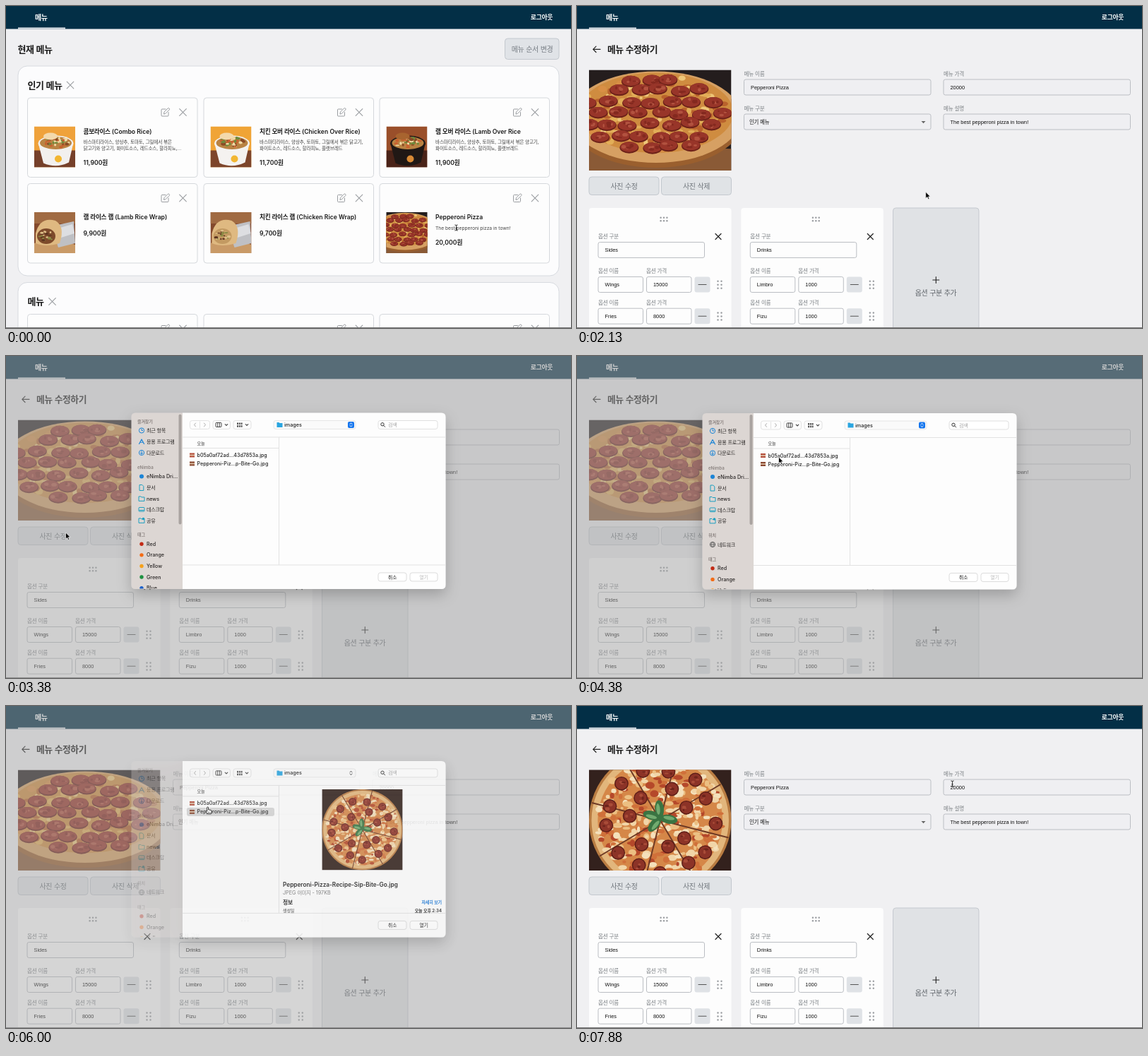
An HTML page that plays this animation: 800x456 px, repeating every 8000 ms.

```html
<!DOCTYPE html>
<html lang="ko">
<head>
<meta charset="utf-8">
<style>
html, body { margin: 0; width: 100%; height: 100%; overflow: hidden; background: #f0f0f2; }
svg { display: block; }
text { font-family: Inter, "Noto Sans CJK KR", sans-serif; white-space: pre; }
.form { font-family: "Liberation Sans", "Noto Sans CJK KR", sans-serif; }
.ko { letter-spacing: -.035em; }
</style>
</head>
<body>
<svg id="stage" width="800" height="456" viewBox="0 0 800 456"></svg>
<script>
// ---------- drawing helpers ----------
const rect = (x, y, w, h, fill, stroke = 'none', r = 0, more = '') =>
  `<rect x="${x}" y="${y}" width="${w}" height="${h}" rx="${r}" fill="${fill}" stroke="${stroke}" ${more}/>`;
const oval = (x, y, rx, ry, fill, more = '') =>
  `<ellipse cx="${x}" cy="${y}" rx="${rx}" ry="${ry}" fill="${fill}" ${more}/>`;
const dot = (x, y, r, fill) => oval(x, y, r, r, fill);
const line = (d, color, w = 1, fill = 'none') =>
  `<path d="${d}" fill="${fill}" stroke="${color}" stroke-width="${w}" stroke-linecap="round" stroke-linejoin="round"/>`;
const shape = (d, fill) => `<path d="${d}" fill="${fill}"/>`;
const group = (id, body, more = '') => `<g id="${id}" ${more}>${body}</g>`;

// y is the optical middle of the line
const text = (x, y, s, size, color = '#222', weight = 400, more = '') =>
  `<text x="${x}" y="${y + size * .36}" font-size="${size}" font-weight="${weight}" fill="${color}" ${more}>` +
  s.replace(/[가-힣]+/g, '<tspan class="ko">$&</tspan>') + '</text>';
const MID = 'text-anchor="middle"', END = 'text-anchor="end"';

const cross = (x, y, r, color, w = 1) =>
  line(`M${x - r} ${y - r}l${2 * r} ${2 * r}m0 ${-2 * r}l${-2 * r} ${2 * r}`, color, w);
const dots = (x, y, cols, rows, gap, color) => {
  let s = '';
  for (let i = 0; i < cols * rows; i++)
    s += dot(x + (i % cols - (cols - 1) / 2) * gap, y + (Math.floor(i / cols) - (rows - 1) / 2) * gap, 1.2, color);
  return s;
};

let seed = 7;
const rnd = (a = 0, b = 1) => {
  seed = (seed * 16807) % 2147483647;
  return a + (b - a) * seed / 2147483647;
};
// count small random ovals spread over an ellipse
const speckle = (count, x, y, rx, ry, size, colors) => {
  let s = '';
  for (let i = 0; i < count; i++) {
    const a = rnd(0, 6.28), q = Math.sqrt(rnd());
    s += oval(x + rx * q * Math.cos(a), y + ry * q * Math.sin(a), rnd(.3, 1) * size, rnd(.25, .7) * size, colors[i % colors.length]);
  }
  return s;
};

// ---------- pictures ----------
const photo = (name, x, y, w, h) => {
  const [body, vw, vh] = photos[name];
  return `<svg x="${x}" y="${y}" width="${w}" height="${h}" viewBox="0 0 ${vw} ${vh}" preserveAspectRatio="xMidYMid slice">${body}</svg>`;
};

const bowl = (wall, table, cup, badge, bread) =>
  rect(0, 0, 58, 58, wall) + rect(0, 34, 58, 24, table) +
  shape('M6 25L13 52Q31 60 49 51L55 25Z', cup) + oval(30.5, 24, 25, 11, cup) + oval(30.5, 23.5, 22.5, 9, '#b98343') +
  speckle(40, 30.5, 23, 19, 7, 3.5, ['#f0d9a4', '#8a4a25', '#6f8a3c', '#c9602f']) +
  oval(23, 14, 10, 5, bread) + dot(34, 46, 5, badge);

const wrap = filling =>
  rect(0, 0, 58, 58, '#84492c') + rect(0, 0, 58, 16, '#a06a42') +
  shape('M0 44L26 36L58 46V58H0Z', '#c99a67') +
  shape('M24 20L56 13L58 44L34 50Z', '#bfc0c4') + shape('M30 24L54 17L57 30L38 36Z', '#dddee1') +
  shape('M2 30Q8 6 30 12Q44 20 36 44Q16 50 2 44Z', '#dfb981') + oval(17, 34, 13, 11, filling) +
  speckle(20, 17, 34, 10, 8, 3, ['#e0c08a', '#5e3420', '#8b8a44']);

function panPizza() {
  let s = rect(0, 0, 202, 143, '#241d1d') + shape('M0 104L202 112V143H0Z', '#8a5a36') +
    oval(95, 73, 122, 66, '#9a5f2e') + oval(95, 67, 121, 65, '#d6a063') + oval(95, 61, 110, 57, '#cf8c40') +
    speckle(160, 95, 61, 105, 53, 7, ['#eec678', '#b9622c', '#e2ae58', '#d98f45']);
  for (let row = 0; row < 7; row++)
    for (let col = 0; col < 8; col++) {
      const x = col * 29 + (row % 2) * 14 + rnd(-4, 4), y = 13 + row * 16 + rnd(-3, 3);
      if (((x - 95) / 110) ** 2 + ((y - 61) / 57) ** 2 > .88) continue;
      s += oval(x, y + 1, 13.5, 8.2, '#6c2119') + oval(x, y, 12.5, 7.2, '#983529') + speckle(4, x, y, 8, 4, 4, ['#b2523f', '#84291f']);
    }
  return s;
}

function basilPizza() {
  let s = rect(0, 0, 114, 114, '#33211d') + dot(57, 57, 57, '#b97c42') + dot(57, 57, 55, '#e2b67c') + dot(57, 57, 50, '#d58748') +
    speckle(380, 57, 57, 50, 50, 4, ['#f4e0bb', '#b5482a', '#ecbf82', '#f1d5a8', '#d0703a']);
  for (let i = 0; i < 4; i++) {
    const a = i * Math.PI / 4 + .25, x = 56 * Math.cos(a), y = 56 * Math.sin(a);
    s += line(`M${57 - x} ${57 - y}L${57 + x} ${57 + y}`, '#6e3a25', 1.1);
  }
  for (let i = 0; i < 20; i++) {
    const outer = i < 13, a = outer ? i * .483 + .1 : i * .898 + .5, q = outer ? 42 : 24;
    const x = 57 + q * Math.cos(a) + rnd(-3, 3), y = 57 + q * Math.sin(a) + rnd(-3, 3);
    s += dot(x, y, 5.6, '#5c1d17') + dot(x, y, 4.8, '#8c3327') + speckle(3, x, y, 3, 3, 2, ['#a94c38', '#6d241b']);
  }
  for (const turn of [10, 130, 195, 265])
    s += `<g transform="translate(57 55) rotate(${turn})">${oval(7, 0, 7, 3.6, '#3a7442')}${oval(7, -1, 4.5, 1.5, '#72ab70')}</g>`;
  return s;
}

const photos = {
  combo: [bowl('#efa23b', '#76402a', '#f2f0ee', '#f2b632', '#f3d9ac'), 58, 58],
  chicken: [bowl('#f0a436', '#7d452b', '#f4f2f0', '#f2b632', '#f3d9ac'), 58, 58],
  lamb: [bowl('#9a4f2a', '#4a2318', '#201815', '#d98a35', '#a8642f'), 58, 58],
  lambWrap: [wrap('#7d4a2b'), 58, 58],
  chickenWrap: [wrap('#c39a62'), 58, 58],
  pan: [panPizza(), 202, 143],
  basil: [basilPizza(), 114, 114],
};

// ---------- pages ----------
const GRAY = '#9a9da1';
const nav = rect(0, 0, 800, 32.5, '#032f46') + rect(17, 30.5, 67, 2, '#e6eaee') +
  text(41, 16, '메뉴', 10, '#fff', 600) + text(774, 16, '로그아웃', 8.8, '#fff', 600, END);

const editIcon = (x, y) =>
  line(`M${x + .5} ${y - 4.5}H${x - 4.5}Q${x - 5.5} ${y - 4.5} ${x - 5.5} ${y - 3.5}V${y + 4.5}Q${x - 5.5} ${y + 5.5} ${x - 4.5} ${y + 5.5}H${x + 3.5}Q${x + 4.5} ${y + 5.5} ${x + 4.5} ${y + 4.5}V${y}`, GRAY) +
  line(`M${x - 2} ${y + 2.2}l.5 -2.7 5.2 -5.2q1.1 -.6 1.9 .2t.2 1.9l-5.2 5.2z`, GRAY);

const panel = (y, title, w) => rect(17, y, 766, 297, '#fcfcfd', '#d7dadf', 13) +
  text(30.5, y + 27, title, 13, '#1b1b1b', 700) + cross(w, y + 27, 4.8, GRAY, 1.1);

function card(i, row, picture, title, price, lines = []) {
  const x = [30.5, 280, 529][i], y = [130, 251.5, 436.5][row];
  let s = rect(x, y, 240.5, 112.5, '#fdfdfd', '#d5d8dc', 4) + editIcon(x + 195, y + 20.5) + cross(x + 220, y + 20.5, 4.8, GRAY, 1.1);
  if (!picture) return s;
  s += photo(picture, x + 9.5, y + 40.5, 58, 58) + text(x + 79, y + 47.5, title, 8.65, '#1b1b1b', 600);
  lines.forEach((l, n) => s += text(x + 79, y + 62.7 + n * 9, l, 6.67, '#444'));
  return s + text(x + 79, y + [70, 83.5, 92][lines.length], price, 8.65, '#1b1b1b', 600);
}

const base = '바스마티라이스, 양상추, 토마토, 그릴에서 볶은';
const sauces = '화이트소스, 레드소스, 할라피뇨, 플랫브레드';
const listPage = text(16.5, 61, '현재 메뉴', 13, '#1b1b1b', 700) +
  rect(706.5, 46, 76.5, 29.5, '#e0e3e7', '#c3c8ce', 4) + text(745, 61, '메뉴 순서 변경', 10, '#757b82', 400, MID) +
  panel(85, '인기 메뉴', 91) + panel(391.5, '메뉴', 65.5) +
  card(0, 0, 'combo', '콤보라이스 (Combo Rice)', '11,900원', [base, '닭고기와 양고기, 화이트소스, 레드소스, 할라피뇨,…']) +
  card(1, 0, 'chicken', '치킨 오버 라이스 (Chicken Over Rice)', '11,700원', [base + ' 닭고기,', sauces]) +
  card(2, 0, 'lamb', '램 오버 라이스 (Lamb Over Rice', '11,900원', [base + ' 양고기,', sauces]) +
  card(0, 1, 'lambWrap', '램 라이스 랩 (Lamb Rice Wrap)', '9,900원') +
  card(1, 1, 'chickenWrap', '치킨 라이스 랩 (Chicken Rice Wrap)', '9,700원') +
  card(2, 1, 'pan', 'Pepperoni Pizza', '20,000원', ['The best pepperoni pizza in town!']) +
  card(0, 2) + card(1, 2) + card(2, 2);

const label = (x, y, s) => text(x, y, s, 7.6, '#7c8085');
const input = (x, y, w, s, pad = 9.5, fill = '#fdfdfd') =>
  rect(x, y, w, 22, fill, '#bbbec3', 2.5) + text(x + pad, y + 11, s, 7.41, '#111', 400, 'class="form"');
const field = (x, y, name, value, pad) => label(x, y, name) + input(x, y + 8, 264.5, value, pad, '#efeff2');
const button = (x, s) => rect(x, 242, 99, 25.5, '#e0e3e6', '#c3c8ce', 4) + text(x + 49.5, 255, s, 10, '#6f757b', 400, MID);

function options(x, title, items) {
  let s = rect(x, 286, 201.5, 190, '#fdfdfd', 'none', 4) + dots(x + 106, 302, 3, 2, 4.4, GRAY) +
    label(x + 13, 326.5, '옵션 구분') + cross(x + 183, 326.5, 4, '#222', 1.2) + input(x + 13, 334.5, 150.5, title);
  items.forEach(([name, price], n) => {
    const y = 375.5 + n * 44.7;
    s += label(x + 13, y, '옵션 이름') + label(x + 81, y, '옵션 가격') +
      input(x + 13, y + 8, 63.5, name) + input(x + 81.5, y + 8, 63.5, price) +
      rect(x + 149.5, y + 8, 22, 22, '#dfe2e6', 'none', 3) + line(`M${x + 155} ${y + 19}h11`, '#555', 1.1) +
      dots(x + 185, y + 19.3, 2, 3, 5, GRAY);
  });
  return s;
}

const editPage = line('M33 61.3H22.8m4.2 -4.2l-4.2 4.2 4.2 4.2', '#222', 1.2) +
  text(43, 61, '메뉴 수정하기', 12.8, '#1b1b1b', 700) +
  group('oldPhoto', photo('pan', 17, 90.5, 201.5, 142.5)) + group('newPhoto', photo('basil', 17, 90.5, 201.5, 142.5)) +
  button(17, '사진 수정') + button(119.5, '사진 삭제') +
  field(236.5, 96, '메뉴 이름', 'Pepperoni Pizza') + field(519, 96, '메뉴 가격', '20000') +
  field(236.5, 145, '메뉴 구분', '인기 메뉴', 7.5) + field(519, 145, '메뉴 설명', 'The best pepperoni pizza in town!') +
  shape('M487.5 163h6l-3 3.2z', '#666') +
  options(17, 'Sides', [['Wings', '15000'], ['Fries', '8000']]) +
  options(232.3, 'Drinks', [['Limbro', '1000'], ['Fizu', '1000']]) +
  rect(447.5, 286, 121.5, 190, '#e0e2e5', '#c5c9cf', 4) + line('M503.8 388h9m-4.5 -4.5v9', '#222', 1.1) +
  text(508, 406, '옵션 구분 추가', 10, '#5f646a', 400, MID);

// ---------- file dialog ----------
const BLUE = '#1a84d6', TEAL = '#1b9fc0';
const head = (y, s) => text(186, y, s, 6.1, '#8b8380', 600);
const item = (y, s, icon) => `<g transform="translate(192 ${y})">${icon}</g>` + text(199, y, s, 7.1, '#2a2726', 500);
const ring = c => oval(0, 0, 3.6, 3.6, 'none', `stroke="${c}"`);
const box = c => rect(-4, -3, 8, 5.6, 'none', c, 1);
const folder = c => line('M-4 3V-3H-1L0 -2H4V3Z', c);
const tags = y => head(y, '태그') +
  [['Red', '#c22c14'], ['Orange', '#f36c17'], ['Yellow', '#f5a11c'], ['Green', '#1f9140'], ['Blue', '#1c60c8']]
    .map(([s, c], n) => item(y + 13.3 + n * 15.6, s, dot(0, 0, 2.7, c))).join('');

const sidebar = shape('M250 81H183.5Q177.5 81 177.5 87V324.5Q177.5 330.5 183.5 330.5H250Z', '#dcd6d3') +
  `<g clip-path="url(#side)">` + head(93.5, '즐겨찾기') +
  item(106, '최근 항목', ring(BLUE) + line('M0 -2V0H1.6', BLUE)) +
  item(122, '응용 프로그램', line('M-3.5 3L0 -3.5L3.5 3M-2 .8H2', BLUE, 1.2)) +
  item(137.5, '다운로드', ring(BLUE) + line('M0 -2V2M-1.5 .5L0 2 1.5 .5', BLUE)) +
  head(158.8, 'eNimba') + item(171, 'eNimba Dri…', dot(0, 0, 3, BLUE)) +
  item(187, '문서', line('M-2.6 -4H.8L2.8 -2V4H-2.6Z', TEAL)) +
  item(202.5, 'news', folder(TEAL)) + item(218, '데스크탑', box(TEAL) + line('M-3 1H3', TEAL)) +
  item(233.5, '공유', folder(TEAL) + dot(2.5, -2.5, 1.8, TEAL)) +
  group('tagsOnly', tags(253.5)) +
  group('withNetwork', head(254, '위치') + item(267, '네트워크', ring('#555') + oval(0, 0, 1.5, 3.6, 'none', 'stroke="#555" stroke-width=".7"') + line('M-3.6 0H3.6', '#555', .7)) + tags(287.5)) +
  '</g>' + rect(244.5, 83, 4, 156, '#a9a3a0', 'none', 2, 'id="scroll"');

const chevron = (x, y, dir, c) => line(`M${x - dir} ${y - 2.4}l${2 * dir} 2.4 ${-2 * dir} 2.4`, c);
const down = x => line(`M${x - 1.8} 97.2l1.8 1.8 1.8 -1.8`, '#444', 1.1);
const upDown = c => line('M487 97l1.5 -1.7 1.5 1.7m-3 2l1.5 1.7 1.5 -1.7', c, .9);
const push = (x, w) => rect(x, 307.5, w, 12, '#fff', '#dcdcdc', 3);

const toolbar = rect(260.5, 92, 28, 12, 'none', '#e2e2e2', 3) + line('M274.5 93.5v9', '#e2e2e2') +
  chevron(267.5, 98, -1, '#aaa') + chevron(281.5, 98, 1, '#aaa') +
  rect(293, 92, 24.5, 12, 'none', '#e2e2e2', 3) + rect(297, 95, 8, 6, 'none', '#444', .8) + line('M299.7 95v6m2.7 0v-6', '#444', .9) + down(312) +
  rect(322, 92, 25, 12, 'none', '#e2e2e2', 3) + [0, 1, 2, 3, 4, 5].map(i => rect(327 + i % 3 * 2.8, i < 3 ? 95 : 98.7, 2, 2.6, '#555')).join('') + down(341) +
  rect(379, 92, 116, 12, '#fafafa', '#e6e6e6', 3) + shape('M383.5 94.5h3l1 1h4v6h-8z', '#2ba5e0') +
  text(394, 98, 'images', 7.2, '#222', 500) +
  rect(527, 92, 84, 12, '#fff', '#e0e0e0', 3) + oval(533, 97.3, 2.2, 2.2, 'none', 'stroke="#333"') + line('M534.7 99l2 2', '#333') + text(541, 98, '검색', 7.1, '#a5a5a5');

const fileIcon = (y, c) => rect(260, y - 3, 7, 6, c) + rect(260, y - .8, 7, 1.6, '#e2c9b0');
const preview = photo('basil', 447.5, 121, 114, 114.5) +
  text(392, 256, 'Pepperoni-Pizza-Recipe-Sip-Bite-Go.jpg', 8.25, '#222', 600) +
  text(392, 267.5, 'JPEG 이미지 - 197KB', 7.2, '#777') +
  text(392, 281, '정보', 7.8, '#222', 700) + text(617, 281, '자세히 보기', 6.1, '#1a78d8', 600, END) +
  text(392, 293, '생성일', 6.1, '#777', 600) + text(617, 293, '오늘 오후 2:34', 6.1, '#222', 600, END);

const dialog = group('sidebar', sidebar) +
  shape('M250 81H616.5Q622.5 81 622.5 87V324.5Q622.5 330.5 616.5 330.5H250Z', '#fdfdfd') + toolbar +
  group('popBlue', rect(484, 93.5, 9, 9, '#1476ee', 'none', 2) + upDown('#fff')) + group('popPlain', upDown('#333')) +
  line('M250.5 115.5H622M386.5 116V296M250.5 131H386M250.5 296.5H622', '#e2e2e2') +
  text(270.5, 124, '오늘', 6.1, '#777', 600) +
  rect(256, 147, 124, 12, 'none', 'none', 3, 'id="pick"') +
  fileIcon(141, '#b5513c') + fileIcon(153, '#8a4a30') +
  text(270.5, 141, 'b05a0af72ad...43d7853a.jpg', 7.1, '#222', 500) +
  text(270.5, 153, 'Pepperoni-Piz...p-Bite-Go.jpg', 7.1, '#222', 500, 'id="pickName"') +
  group('preview', preview) +
  push(527, 40) + push(572, 39) + text(547, 313.5, '취소', 7.1, '#222', 500, MID) +
  text(591.5, 313.5, '열기', 7.1, '#222', 500, MID + ' id="open"');

// ---------- pointer ----------
const pointer =
  group('arrow', `<path d="M0 0V9.2L2.2 7.2 3.7 10.5 5.2 9.8 3.8 6.7H6.6Z" fill="#000" stroke="#fff" stroke-width=".7"/>`) +
  group('hand', line('M-1 1Q-1 0 0 0T1 1V3.8L4.6 4.5Q5.8 4.9 5.6 6.2L4.8 9.8H.2L-2.8 6.4Q-3.2 5 -1 6Z', '#222', .9, '#fff') + line('M1 7V8.6M2.8 7V8.6', '#222', .6)) +
  group('beam', line('M-1.7 -4Q0 -4 0 -3Q0 -4 1.7 -4M0 -3V3M-1.7 4Q0 4 0 3Q0 4 1.7 4M-.9 .9H.9', '#222', .9));

document.getElementById('stage').innerHTML =
  '<defs><clipPath id="side"><rect x="177.5" y="81" width="66.5" height="249"/></clipPath>' +
  '<filter id="shadow" x="-20%" y="-20%" width="140%" height="150%"><feDropShadow dx="0" dy="8" stdDeviation="10" flood-opacity=".22"/></filter></defs>' +
  rect(0, 0, 800, 456, '#f0f0f2') + group('list', listPage) + group('edit', editPage) + nav +
  rect(0, 455, 800, 1, '#777') + rect(0, 0, 800, 456, '#a5a6a5', 'none', 0, 'id="veil"') +
  group('dialog', dialog, 'filter="url(#shadow)"') + group('pointer', pointer);

// ---------- motion ----------
const path = [[0, 637.5, 314], [625, 637.5, 314], [1500, 716, 270.5], [1875, 716, 270.5], [2500, 84.5, 250],
  [3375, 84.5, 250], [4000, 285.5, 143], [6750, 285.5, 143], [7625, 504, 116], [7875, 531.5, 110], [8000, 531.5, 110]];
const looks = [[0, 'beam'], [750, 'arrow'], [1500, 'hand'], [1875, 'arrow'], [2500, 'hand'], [3125, 'arrow'],
  [6000, 'hand'], [6875, 'arrow'], [7875, 'beam']];

const $ = id => document.getElementById(id);
const set = (id, name, value) => $(id).setAttribute(name, value);
const show = (id, on) => set(id, 'display', on ? 'inline' : 'none');
const clamp = v => Math.max(0, Math.min(1, v));

function draw(now) {
  const t = Math.floor(now % 8000 / 125) * 125;   // eight pictures a second
  const onEdit = t >= 2000, swapped = t >= 6375, closing = t >= 6000, picked = t >= 4625;
  show('list', !onEdit);
  show('edit', onEdit);
  show('oldPhoto', !swapped);
  show('newPhoto', swapped);

  const k = closing ? clamp(.78 - (t - 6000) / 300) : clamp((t - 3000) / 390);
  set('veil', 'opacity', .52 * clamp(k * 1.12));
  show('dialog', k > 0);
  set('dialog', 'opacity', clamp(k * 1.08));
  set('dialog', 'transform', `translate(0 ${-14 * (1 - k)})`);
  set('sidebar', 'opacity', closing ? .35 : 1);
  show('scroll', !closing);
  show('tagsOnly', t < 3500);
  show('withNetwork', t >= 3500);
  show('popBlue', !closing);
  show('popPlain', closing);
  show('preview', picked);
  set('pick', 'fill', closing ? '#d6d6d6' : picked ? '#1463d8' : 'none');
  set('pickName', 'fill', picked && !closing ? '#fff' : '#222');
  set('open', 'fill', picked ? '#222' : '#bdbdbd');

  const n = path.findIndex(p => p[0] > t), [t0, x0, y0] = path[n - 1], [t1, x1, y1] = path[n];
  const u = (t - t0) / (t1 - t0), e = u * u * (3 - 2 * u);
  set('pointer', 'transform', `translate(${x0 + (x1 - x0) * e} ${y0 + (y1 - y0) * e})`);
  const look = looks.filter(l => l[0] <= t).pop()[1];
  for (const id of ['arrow', 'hand', 'beam']) show(id, id === look);
}

const start = performance.now();
function tick() {
  draw(performance.now() - start);
  requestAnimationFrame(tick);
}
tick();
</script>
</body>
</html>
```
